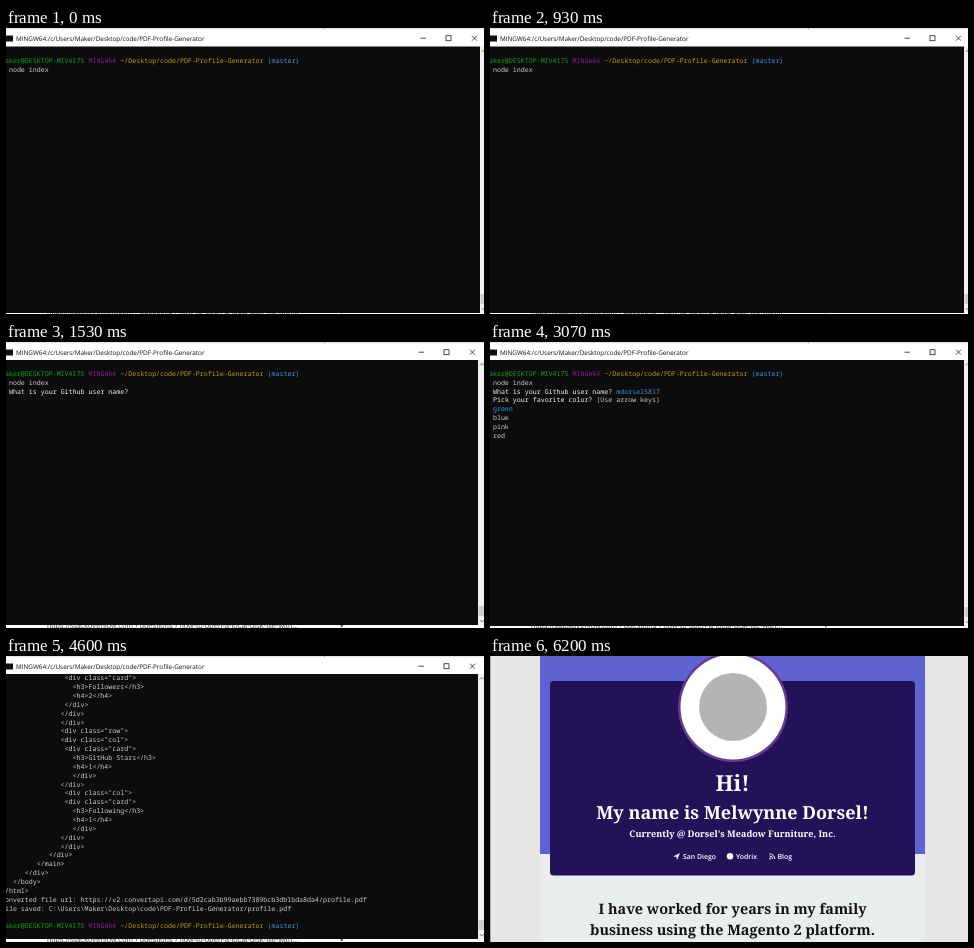
An HTML page with a canvas for the animation above (7670 ms loop, 478 px wide and 286 px high).

```html
<!DOCTYPE html>
<html lang="en">
<head>
<meta charset="utf-8">
<title>Profile generator demo</title>
<style>
html, body { margin: 0; width: 100%; height: 100%; overflow: hidden; background: #fff; }
canvas { display: block; width: 478px; height: 286px; }
</style>
</head>
<body>
<canvas id="stage" width="478" height="286"></canvas>
<script>
const ctx = document.getElementById('stage').getContext('2d');
const W = 478, H = 286, LOOP = 7670;

const MONO = '6.63px "Noto Sans Mono", "DejaVu Sans Mono", monospace';
const SANS = '"Open Sans", "Noto Sans", sans-serif';
const SLAB = '"Noto Serif", serif';
const CELL = 6.63 * 0.6, ROW = 8.86, LEFT = -5;

const GREY = '#cccccc', WHITE = '#f2f2f2', GREEN = '#13a10e';
const PURPLE = '#881798', YELLOW = '#c19c00', CYAN = '#3a96dd';

const PROMPT = [
  ['Maker@DESKTOP-MIV4175 ', GREEN],
  ['MINGW64 ', PURPLE],
  ['~/Desktop/code/PDF-Profile-Generator ', YELLOW],
  ['(master)', CYAN]
];
const COMMAND = [['$ node index', GREY]];
const QUESTION = ['What is your Github user name? ', WHITE];
const MARK = ['? ', GREEN];

const indent = (columns, text) => [[' '.repeat(columns) + text, GREY]];
const open = (columns, name) => indent(columns, `<div class="${name}">`);
const close = (columns, tag = 'div') => indent(columns, `</${tag}>`);
const stat = (label, value) => [
  indent(18, `<h3>${label}</h3>`),
  indent(18, `<h4>${value}</h4>`)
];

const asking = [PROMPT, COMMAND, [MARK, QUESTION]];
const choosing = [
  PROMPT, COMMAND,
  [MARK, QUESTION, ['mdorsel5817', CYAN]],
  [MARK, ['Pick your favorite color? ', WHITE], ['(Use arrow keys)', GREY]],
  [['> green', CYAN]],
  indent(2, 'blue'), indent(2, 'pink'), indent(2, 'red')
];
const output = [
  open(16, 'card'), ...stat('Followers', 2), close(16), close(15), close(15),
  open(15, 'row'), open(15, 'col'), open(16, 'card'), ...stat('GitHub Stars', 1),
  close(18), close(15),
  open(16, 'col'), open(16, 'card'), ...stat('Following', 1),
  close(18), close(15), close(15), close(12),
  close(9, 'main'), close(6), close(3, 'body'), close(0, 'html'),
  indent(0, 'Converted file url: https://v2.convertapi.com/d/5d2cab3b99aebb7389bcb3db1bda8da4/profile.pdf'),
  indent(0, 'File saved: C:\\Users\\Maker\\Desktop\\code\\PDF-Profile-Generator/profile.pdf'),
  [], PROMPT
];

const scenes = [
  { until: 1530, draw: () => terminal([PROMPT, COMMAND], 35.2, 474, 285) },
  { until: 3070, draw: () => terminal(asking, 34.2, 472, 283) },
  { until: 4600, draw: () => terminal(choosing, 33.8, 474, 284) },
  { until: 6130, draw: () => terminal(output, 24.2, 472, 283) },
  { until: LOOP, draw: profile }
];

function rect(color, x, y, w, h) {
  ctx.fillStyle = color;
  ctx.fillRect(x, y, w, h);
}

function disc(color, x, y, r) {
  ctx.fillStyle = color;
  ctx.beginPath();
  ctx.arc(x, y, r, 0, Math.PI * 2);
  ctx.fill();
}

function path(points, color, width = 0.8) {
  ctx.strokeStyle = color;
  ctx.lineWidth = width;
  ctx.beginPath();
  points.forEach(([x, y]) => ctx.lineTo(x, y));
  ctx.stroke();
}

function label(text, x, y, font, color, align = 'left') {
  ctx.font = font;
  ctx.fillStyle = color;
  ctx.textAlign = align;
  ctx.fillText(text, x, y);
}

function terminal(lines, baseline, right, bottom) {
  const top = bottom > 284 ? 18.5 : 18;
  rect('#fff', 0, 0, W, H);

  label('https://stackoverflow.com › questions › how-to-open-a-local-disk-file-with...',
    41, 286, '7.7px "Liberation Sans", Arial, sans-serif', '#4d5156');
  label('▾', 334, 286, '7px "DejaVu Sans", sans-serif', '#4d5156');

  rect('#e4e4e4', 0, 0, W, 1.5);
  rect('#9a9a9a', 318, 0, 1, 1.5);
  rect('#fff', 0, 1.5, W, top - 1.5);
  titleBar(right);

  rect('#0c0c0c', 0, top, right, bottom - top);
  scrollBar(right, top, bottom);

  lines.forEach((line, row) => {
    let column = 0;
    for (const [text, color] of line) {
      label(text, LEFT + column * CELL, baseline + row * ROW, MONO, color);
      column += text.length;
    }
  });
}

function titleBar(right) {
  rect('#111', 0, 7.5, 7, 6);
  label('MINGW64:/c/Users/Maker/Desktop/code/PDF-Profile-Generator',
    10, 12.7, '6.36px ' + SANS, '#111');
  const x = right - 5.5, y = 10.2;
  path([[x - 54, y], [x - 48.5, y]], '#222');
  ctx.strokeRect(x - 28.5, y - 2.5, 5, 5);
  path([[x - 2.5, y - 2.5], [x + 2.5, y + 2.5]], '#222');
  path([[x - 2.5, y + 2.5], [x + 2.5, y - 2.5]], '#222');
}

function scrollBar(right, top, bottom) {
  const x = right + 3.8;
  rect('#f0f0f0', right, top, W - right, bottom - top);
  rect('#cdcdcd', right + 0.5, bottom - 19, W - right, 10);
  path([[x - 2, top + 5.5], [x, top + 3.5], [x + 2, top + 5.5]], '#555');
  path([[x - 2, bottom - 5], [x, bottom - 3], [x + 2, bottom - 5]], '#555');
}

function profile() {
  rect('#e6e6e6', 0, 0, W, H);
  rect('#a8a8a8', 0, 0, 1, H);
  rect('#e9edee', 50, 0, 385, H);
  rect('#5f63d1', 50, 0, 385, 198);

  ctx.fillStyle = '#241259';
  ctx.beginPath();
  ctx.roundRect(60, 25, 365, 194.5, 3.5);
  ctx.fill();

  disc('#663a8c', 243, 51, 55);
  disc('#fff', 243, 51, 52.5);
  disc('#b4b4b4', 243, 51, 34);

  const centered = (text, y, size, color) =>
    label(text, 242.5, y, `bold ${size}px ${SLAB}`, color, 'center');
  centered('Hi!', 134.5, 22, '#fff');
  centered('My name is Melwynne Dorsel!', 163, 18, '#fff');
  centered("Currently @ Dorsel's Meadow Furniture, Inc.", 180.5, 9.1, '#fff');
  centered('I have worked for years in my family', 257.5, 14.4, '#111');
  centered('business using the Magento 2 platform.', 279, 14.4, '#111');

  links();
}

function links() {
  const font = '600 6.9px ' + SANS;
  label('San Diego', 193, 202.6, font, '#fff');
  label('Yodrix', 246, 202.6, font, '#fff');
  label('Blog', 287.5, 202.6, font, '#fff');

  ctx.beginPath();
  [[183, 200.5], [190, 197], [187, 204], [186.5, 200.8]].forEach(([x, y]) => ctx.lineTo(x, y));
  ctx.fill();

  disc('#fff', 240, 200.2, 3.2);

  disc('#fff', 280, 202.6, 0.9);
  ctx.strokeStyle = '#fff';
  ctx.lineWidth = 1;
  for (const r of [3, 5.2]) {
    ctx.beginPath();
    ctx.arc(279.6, 203, r, -Math.PI / 2, 0);
    ctx.stroke();
  }
}

function render() {
  const time = performance.now() % LOOP;
  ctx.textRendering = 'geometricPrecision';
  scenes.find(scene => time < scene.until).draw();
  requestAnimationFrame(render);
}
render();
</script>
</body>
</html>
```
